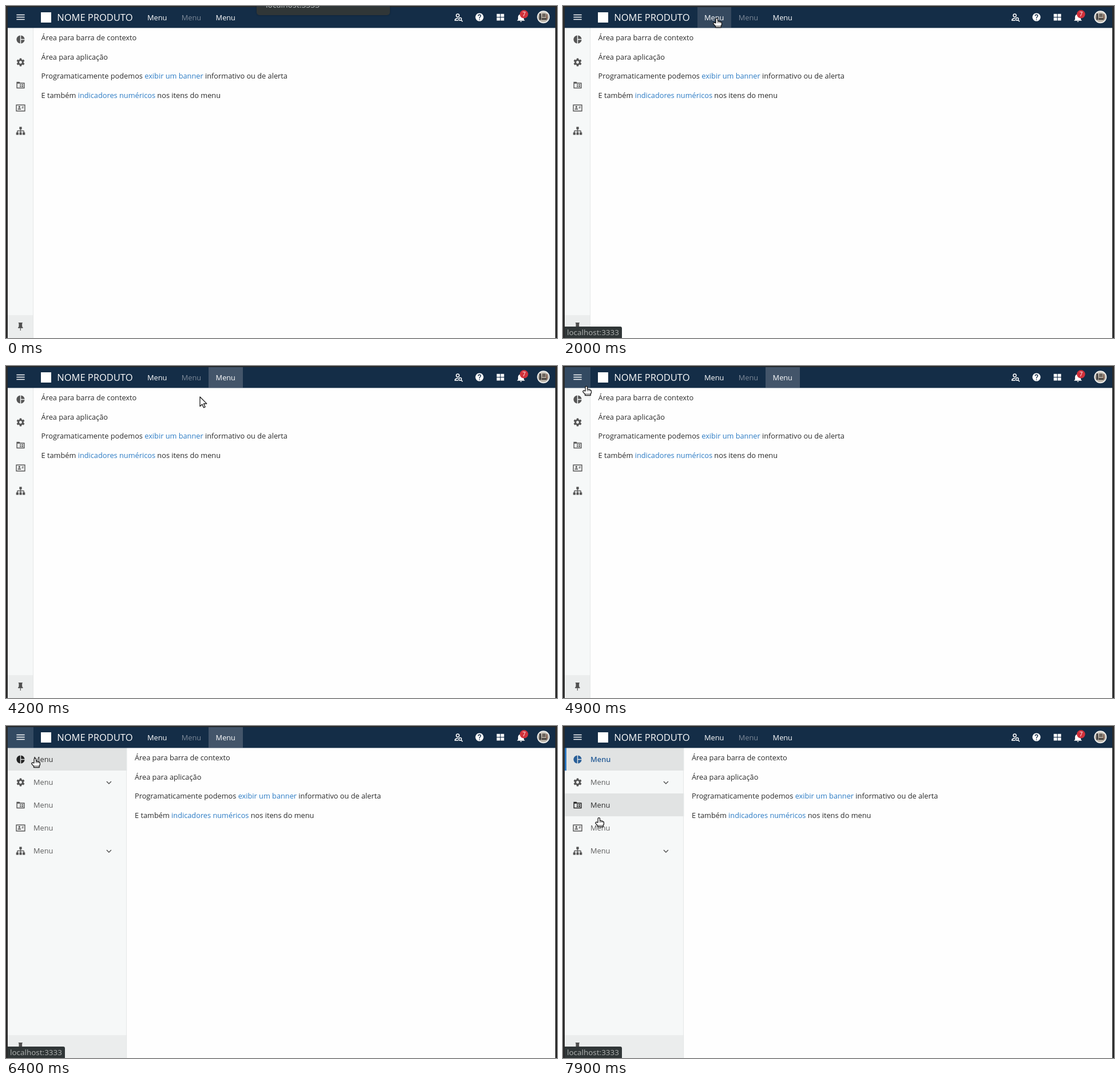
An HTML page with a canvas for the animation above (8 s loop, 963 by 581 pixels).

```html
<!DOCTYPE html>
<html lang="pt">
<head>
<meta charset="utf-8">
<title>Menu</title>
<style>
html, body { margin: 0; width: 100%; height: 100%; overflow: hidden; background: #fefefe; }
canvas { display: block; width: 963px; height: 581px; }
</style>
</head>
<body>
<canvas id="stage" width="963" height="581"></canvas>
<script>
const ctx = document.getElementById('stage').getContext('2d');
const LOOP = 8000, STEP = 100;
const SANS = '"Open Sans", "Noto Sans", sans-serif';
const SYSTEM = '"Noto Sans", sans-serif';

// Icons on a 24 unit grid
const icons = {
  bars: 'M3,6H21V8H3ZM3,11H21V13H3ZM3,16H21V18H3Z',
  pie: 'M11,2V22C5.9,21.5 2,17.2 2,12C2,6.8 5.9,2.5 11,2M13,2V11H22C21.5,6.2 17.8,2.5 13,2M13,13V22C17.7,21.5 21.5,17.8 22,13Z',
  folder: 'M2,4H9L11,6H22V20H2ZM4,8V18H20V8ZM10,9.5H13V12H10ZM14.5,9.5H18.5V12H14.5ZM10,13.5H13V16.5H10ZM14.5,13.5H18.5V16.5H14.5Z',
  card: 'M0.5,3.5H23.5V20.5H0.5ZM2.5,5.5V18.5H21.5V5.5ZM9,7A2.4,2.4 0 1,1 8.9,7ZM4.5,16C4.5,11.8 13.5,11.8 13.5,16ZM15,8H20V9.6H15ZM15,11H19V12.6H15Z',
  tree: 'M9,2V8H11V11H5C3.9,11 3,11.9 3,13V16H1V22H7V16H5V13H11V16H9V22H15V16H13V13H19V16H17V22H23V16H21V13C21,11.9 20.1,11 19,11H13V8H15V2Z',
  pin: 'M16,12V4H17V2H7V4H8V12L6,14V16H11.2V22H12.8V16H18V14Z',
  help: 'M15.07,11.25L14.17,12.17C13.45,12.89 13,13.5 13,15H11V14.5C11,13.39 11.45,12.39 12.17,11.67L13.41,10.41C13.78,10.05 14,9.55 14,9A2,2 0 0,0 10,9H8A4,4 0 0,1 16,9C16,9.88 15.64,10.67 15.07,11.25M13,19H11V17H13ZM12,2A10,10 0 1,0 12.01,2Z',
  bell: 'M21,19V20H3V19L5,17V11C5,7.9 7,5.2 10,4.3V4A2,2 0 0,1 14,4V4.3C17,5.2 19,7.9 19,11V17ZM14,21A2,2 0 0,1 10,21Z'
};
for (const k in icons) icons[k] = new Path2D(icons[k]);
icons.cog = cogPath();

const hand = new Path2D('M-0.9,7.8V1.1Q-0.9,-0.3 0.8,-0.3Q2.5,-0.3 2.5,1.1V4.8Q4,4.2 5,5.3Q6.6,4.7 7.4,6Q9.4,5.8 9.4,7.9V10.9L8.2,12.9V15.4H-1.4V13.4L-5.2,9.2Q-5.5,7.3 -3.6,7.2Z');
const arrow = new Path2D('M0,0V16.5L3.9,12.9L6.5,18.7L9.1,17.6L6.5,11.9H11.8Z');

// Pointer moves: start, end, destination
const START = [461, 73];
const moves = [
  [1000, 1300, 322, 306], [1500, 2000, 268, 22],
  [2700, 2800, 291, 58], [3000, 3300, 391, 23],
  [3900, 3900, 382, 57], [4100, 4900, 40, 36],
  [5000, 5200, 30, 19], [6100, 6400, 50, 57],
  [7600, 7900, 62, 161]
];
const within = (t, a, b) => t >= a && t < b;
const smooth = p => p * p * (3 - 2 * p);

function cogPath() {
  const p = new Path2D();
  for (let i = 0; i < 6; i++) {
    const a = (i - 1.5) * Math.PI / 3;
    for (const [d, r] of [[-0.36, 7.4], [-0.22, 10.2], [0.22, 10.2], [0.36, 7.4]])
      p.lineTo(12 + r * Math.cos(a + d), 12 + r * Math.sin(a + d));
  }
  p.closePath();
  p.moveTo(15.4, 12);
  p.arc(12, 12, 3.4, 0, 7);
  return p;
}

function pointer(t) {
  let [x, y] = START;
  for (const [a, b, tx, ty] of moves) {
    if (t < a) break;
    const p = smooth(Math.min(1, (t - a + STEP) / (b - a + STEP)));
    x += (tx - x) * p;
    y += (ty - y) * p;
  }
  return [Math.round(x), Math.round(y)];
}

function rect(x, y, w, h, color) {
  ctx.fillStyle = color;
  ctx.fillRect(x, y, w, h);
}

function panel(x, y, w, h, radii) {
  ctx.fillStyle = '#303637';
  ctx.beginPath();
  ctx.roundRect(x, y, w, h, radii);
  ctx.fill();
}

function disc(x, y, r, color) {
  ctx.fillStyle = color;
  ctx.beginPath();
  ctx.arc(x, y, r, 0, 7);
  ctx.fill();
}

function text(s, x, y, color, size = 12.77, weight = 400, family = SANS) {
  ctx.font = `${weight} ${size}px ${family}`;
  ctx.fillStyle = color;
  ctx.fillText(s, x, y);
  return x + ctx.measureText(s).width;
}

function icon(name, x, y, size, color) {
  ctx.save();
  ctx.translate(x - size / 2, y - size / 2);
  ctx.scale(size / 24, size / 24);
  ctx.fillStyle = color;
  ctx.fill(icons[name], 'evenodd');
  ctx.restore();
}

function stroke(color, width, draw) {
  ctx.strokeStyle = color;
  ctx.lineWidth = width;
  ctx.beginPath();
  draw();
  ctx.stroke();
}

function content(x) {
  const ink = '#2a2a2a', blue = '#2b7bc4';
  const lines = [
    ['Área para barra de contexto'],
    ['Área para aplicação'],
    ['Programaticamente podemos ', 'exibir um banner', ' informativo ou de alerta'],
    ['E também ', 'indicadores numéricos', ' nos itens do menu']
  ];
  lines.forEach((parts, i) => {
    let at = x;
    parts.forEach((s, j) => { at = text(s, at, Math.round(60 + i * 33.6), j === 1 ? blue : ink); });
  });
}

function sidebar(w, t) {
  const active = t >= 7000;
  const hover = t >= 6200 ? Math.floor((pointer(t - STEP)[1] - 38) / 40) : -1;
  ctx.save();
  ctx.beginPath();
  ctx.rect(3, 38, w - 3, 543);
  ctx.clip();
  rect(3, 38, w - 3, 543, '#f6f8f8');
  rect(3, 541, w - 3, 40, '#ebeded');
  ['pie', 'cog', 'folder', 'card', 'tree'].forEach((name, i) => {
    const top = 38 + i * 40, on = active && i === 0, over = hover === i;
    if (on || over) rect(3, top, w, 40, '#e1e3e3');
    if (on) rect(3, top, 3, 40, '#2b78c2');
    const color = on ? '#285e98' : over ? '#222' : '#555';
    icon(name, 25.5, top + 20.5, 17, color);
    if (w > 50) {
      text('Menu', 48, top + 25, on ? color : over ? '#2c2c2c' : '#5c5c5c', 12.77, on ? 600 : 400);
      if (i === 1 || i === 4) stroke('#555', 1.5, () => {
        ctx.moveTo(w - 35.5, top + 19);
        ctx.lineTo(w - 31.5, top + 23);
        ctx.lineTo(w - 27.5, top + 19);
      });
    }
  });
  icon('pin', 25.3, 561, 17, '#505050');
  ctx.restore();
  rect(Math.round(w) - 1, 38, 1, 543, '#e4e7e7');
}

function avatar(x, y) {
  disc(x, y, 11, '#f4f4f2');
  ctx.save();
  ctx.beginPath();
  ctx.arc(x, y, 9.4, 0, 7);
  ctx.clip();
  const g = ctx.createLinearGradient(0, y - 10, 0, y + 10);
  g.addColorStop(0, '#d9d5cd');
  g.addColorStop(0.6, '#a79e93');
  g.addColorStop(1, '#c9c2b8');
  rect(x - 10, y - 10, 20, 20, g);
  rect(x - 7, y - 6, 3, 11, '#3e3d3d');
  rect(x - 2, y - 6, 6, 6, '#6b645d');
  rect(x - 3, y + 2, 9, 3, '#45403c');
  rect(x + 5, y - 5, 2, 8, '#7d5a4c');
  ctx.restore();
}

function header(t) {
  const white = '#fff', focus = '#43556a', over = '#35495f';
  rect(3, 2, 957, 36.4, '#142d47');
  if (within(t, 4900, 7000)) rect(3, 2, 45, 36, '#334a62');
  if (within(t, 1800, 3600)) rect(235, 2, 59, 36, t < 2700 ? over : focus);
  if (within(t, 3200, 7000)) rect(354, 2, 60, 36, t < 3900 ? over : focus);

  icon('bars', 25.5, 19.5, 19, white);
  rect(61, 11, 18, 18, white);
  text('NOME PRODUTO', 89.2, 26, white, 16.5);
  [white, '#7d8998', white].forEach((c, i) => text('Menu', 247 + i * 59.8, 25, c));

  stroke(white, 1.5, () => {
    ctx.arc(789.5, 16.6, 2.6, 0, 7);
    ctx.moveTo(790.5, 25.2);
    ctx.lineTo(784.8, 25.2);
    ctx.lineTo(784.8, 23.8);
    ctx.quadraticCurveTo(786, 21.5, 790, 21.4);
    ctx.moveTo(796, 22.9);
    ctx.arc(793.7, 22.9, 2.3, 0, 7);
    ctx.moveTo(795.4, 24.6);
    ctx.lineTo(798, 27.2);
  });
  icon('help', 827.5, 19.5, 17, white);
  for (const x of [857.6, 864.6]) for (const y of [13.8, 20.2]) rect(x, y, 5.9, 5.3, white);
  icon('bell', 900, 20, 17.5, white);
  disc(905.3, 14.3, 7.3, '#d2323c');
  text('7', 902.4, 18, white, 10.2);
  avatar(939.2, 19.2);
}

function status(t) {
  let a = 0;
  if (within(t, 1900, 3000) || within(t, 3300, 4200)) a = 1;
  if (t >= 5100) a = t < 5200 ? 0.6 : t < 5400 ? 0.9 : 1;
  if (!a) return;
  ctx.globalAlpha = a;
  panel(3, 561, 100, 20, [0, 3, 0, 0]);
  text('localhost:3333', 7, 575.6, '#a9acab', 13.4, 400, SYSTEM);
  ctx.globalAlpha = 1;
}

function popups(t) {
  if (t < 600) {
    ctx.save();
    ctx.globalAlpha = t < 500 ? 1 : 0.5;
    ctx.shadowColor = 'rgba(0,0,0,.35)';
    ctx.shadowBlur = 3;
    panel(438, -20, 233, 36, 5);
    ctx.shadowBlur = 0;
    text('localhost:3333', 454, 3.2, '#b0b4b3', 13.9, 400, SYSTEM);
    ctx.restore();
  }
  if (within(t, 2200, 2300)) {
    panel(269, 36, 62, 32, 4);
    text('Menu', 282, 56.5, '#e8e8e8', 13, 400, SYSTEM);
  }
}

function cursor(t) {
  if (t < 800) return;
  const linked = within(t, 1800, 2700) || within(t, 3200, 3900) || t >= 4900;
  const shape = linked ? hand : arrow;
  ctx.save();
  ctx.translate(...pointer(t));
  ctx.save();
  ctx.shadowColor = 'rgba(0,0,0,.3)';
  ctx.shadowBlur = 2;
  ctx.shadowOffsetY = 1;
  ctx.fillStyle = '#fff';
  ctx.fill(shape);
  ctx.restore();
  ctx.strokeStyle = '#111';
  ctx.lineWidth = 1.2;
  ctx.lineJoin = 'round';
  ctx.stroke(shape);
  if (linked) stroke('#111', 0.8, () => {
    for (const x of [2.5, 5, 7.4]) {
      ctx.moveTo(x, 5.5);
      ctx.lineTo(x, 8.1);
    }
    ctx.moveTo(-1.4, 13.1);
    ctx.lineTo(8.2, 13.1);
  });
  ctx.restore();
}

function windowEdges() {
  rect(0, 0, 963, 2, '#26292b');
  rect(0, 0, 3, 581, '#2a2a2a');
  rect(960, 0, 3, 581, '#2a2a2a');
}

function draw(t) {
  rect(0, 0, 963, 581, '#fefefe');
  const u = Math.max(0, Math.min(1, (t - 5600) / 400));
  const shift = 163.4 * (1 - Math.pow(1 - u, 3.7));
  content(61.6 + shift);
  sidebar(48 + shift, t);
  header(t);
  windowEdges();
  status(t);
  cursor(t);
  popups(t);
}

function frame() {
  // The pointer is sampled ten times a second
  draw(Math.floor(performance.now() % LOOP / STEP) * STEP);
  requestAnimationFrame(frame);
}
frame();
</script>
</body>
</html>
```
